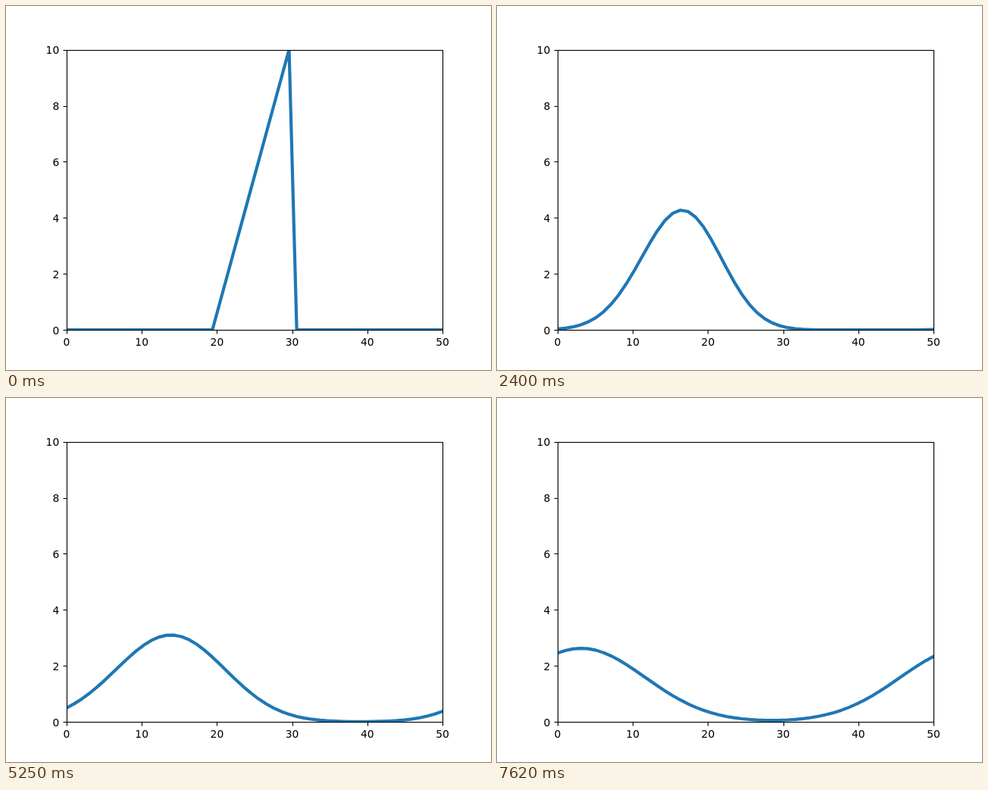
An HTML page with a canvas for the animation above (7.65 s loop, 640x480 px).

```html
<!DOCTYPE html>
<html lang="en">
<head>
<meta charset="utf-8">
<title>Travelling wave</title>
<style>
  html, body { margin: 0; width: 100%; height: 100%; overflow: hidden; background: #fff; }
  canvas { display: block; width: 640px; height: 480px; }
</style>
</head>
<body>
<canvas id="plot" width="640" height="480"></canvas>
<script>
const ctx = document.getElementById('plot').getContext('2d');

const STEP_MS = 30, STEPS = 255, CELLS = 50;
const PT = 100 / 72;
const box = { left: 80, right: 576, top: 57.6, bottom: 427.2 };

const toX = x => box.left + (box.right - box.left) * x / 50;
const toY = y => box.bottom - (box.bottom - box.top) * y / 10;
const snap = v => Math.round(v) + 0.5;

// Upwind advection on a periodic grid, Courant number 0.5
function simulate() {
  const ramp = Array.from({ length: CELLS }, (_, i) => i > 19 && i < 30 ? i - 19 : 0);
  const states = [ramp];
  while (states.length < STEPS) {
    const u = states[states.length - 1];
    states.push(u.map((v, i) => (v + u[(i + CELLS - 1) % CELLS]) / 2));
  }
  return states;
}

function segment(x1, y1, x2, y2) {
  ctx.beginPath();
  ctx.moveTo(x1, y1);
  ctx.lineTo(x2, y2);
  ctx.stroke();
}

function drawCurve(u) {
  ctx.save();
  ctx.beginPath();
  ctx.rect(80, 58, 496, 369);
  ctx.clip();
  ctx.strokeStyle = '#1f77b4';
  ctx.lineWidth = 3 * PT;
  ctx.lineJoin = 'round';
  ctx.lineCap = 'square';
  ctx.beginPath();
  u.forEach((v, i) => ctx.lineTo(toX(i * 50 / (CELLS - 1)), toY(v)));
  ctx.stroke();
  ctx.restore();
}

function drawAxes() {
  const left = snap(box.left), right = snap(box.right);
  const top = snap(box.top), bottom = snap(box.bottom);
  ctx.strokeStyle = ctx.fillStyle = '#000';
  ctx.lineWidth = 0.8 * PT;
  ctx.strokeRect(left, top, right - left, bottom - top);

  ctx.font = `${10 * PT}px "DejaVu Sans", sans-serif`;
  ctx.textBaseline = 'alphabetic';
  ctx.textAlign = 'center';
  for (let x = 0; x <= 50; x += 10) {
    const px = snap(toX(x));
    segment(px, bottom, px, bottom + 5);
    ctx.fillText(x, toX(x), 448);
  }
  ctx.textAlign = 'right';
  for (let y = 0; y <= 10; y += 2) {
    const py = snap(toY(y));
    segment(left - 5, py, left, py);
    ctx.fillText(y, box.left - 7 * PT, Math.round(toY(y) + 5.5));
  }
}

const states = simulate();
const start = performance.now();
let shown = -1;

function draw(now) {
  const step = Math.floor(Math.max(0, now - start) / STEP_MS) % STEPS;
  if (step !== shown) {
    shown = step;
    ctx.fillStyle = '#fff';
    ctx.fillRect(0, 0, 640, 480);
    drawCurve(states[step]);
    drawAxes();
  }
  requestAnimationFrame(draw);
}
draw(start);
</script>
</body>
</html>
```
